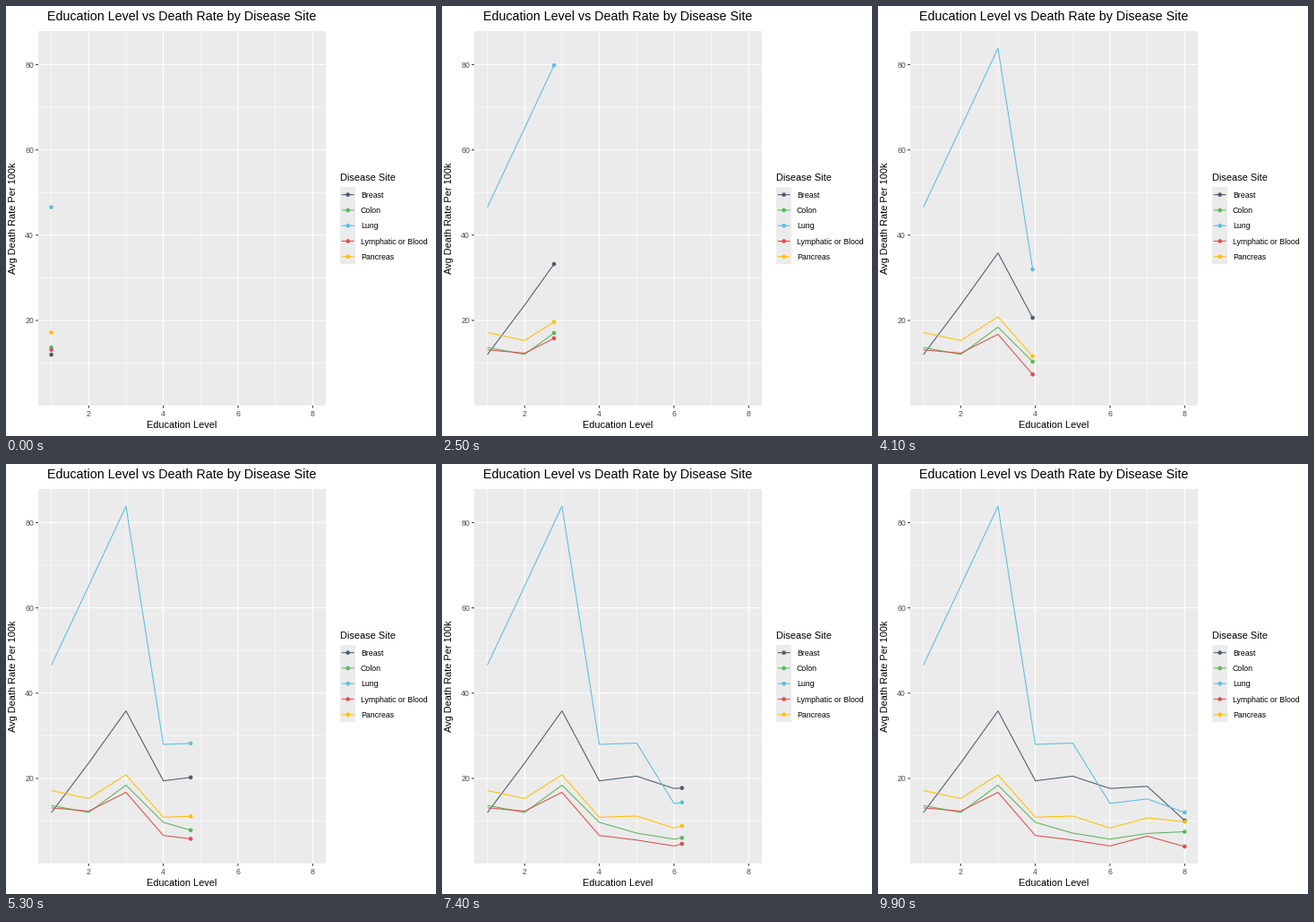
A matplotlib script for the animation above (10000 ms loop, 480x480 px).

```python
import matplotlib.pyplot as plt
import numpy as np
from matplotlib.animation import FuncAnimation
from matplotlib.patches import Circle, Rectangle

plt.rcParams["font.family"] = "Liberation Sans"

SIZE, DPI = 480, 72          # at 72 dpi one point is one pixel
FRAMES, INTERVAL = 100, 100
LEFT, TOP, RIGHT, BOTTOM = 36, 28, 357, 446
LINE, DOT = 1.07, 2.3
PANEL, TEXT, TICK = "#EBEBEB", "#4D4D4D", "#333333"

SERIES = {
    "Breast": ("#4E5D6C", [11.97, 23.61, 35.84, 19.45, 20.53, 17.65, 18.15, 10.13]),
    "Colon": ("#5CB85C", [13.66, 12.02, 18.42, 9.71, 7.18, 5.76, 7.10, 7.50]),
    "Lung": ("#5BC0DE", [46.55, 65.11, 83.86, 27.98, 28.30, 14.14, 15.19, 12.02]),
    "Lymphatic or Blood": ("#D9534F", [13.11, 12.33, 16.74, 6.62, 5.55, 4.16, 6.47, 4.03]),
    "Pancreas": ("#FFC107", [17.16, 15.29, 20.84, 10.90, 11.18, 8.36, 10.76, 9.83]),
}
LEVELS = np.arange(1, 9)
# Each level is reached on a whole frame, with linear motion in between.
KEYS = np.round((LEVELS - 1) * (FRAMES - 1) / 7)


def px(level):
    return 50.6 + 41.67 * (level - 1)


def py(rate):
    return 351 - 4.76 * (rate - 20)


fig = plt.figure(figsize=(SIZE / DPI, SIZE / DPI), dpi=DPI, facecolor="white")
ax = fig.add_axes([0, 0, 1, 1])
ax.set(xlim=(0, SIZE), ylim=(SIZE, 0))
ax.axis("off")


def rect(x, y, w, h, color):
    ax.add_patch(Rectangle((x, y), w, h, fc=color, lw=0))


def line(xs, ys, color, width=LINE, z=2):
    return ax.plot(xs, ys, color=color, lw=width, zorder=z, snap=False,
                   solid_capstyle="butt", solid_joinstyle="round")[0]


def dot(x, y, color):
    return ax.add_patch(Circle((x, y), DOT, fc=color, lw=0, zorder=4))


def text(x, y, s, size, color="black", ha="left", **kw):
    ax.text(x, y, s, fontsize=size, color=color, ha=ha,
            va=kw.pop("va", "baseline"), **kw)


def draw_panel():
    rect(LEFT, TOP, RIGHT - LEFT, BOTTOM - TOP, PANEL)
    for level in LEVELS:
        major = level % 2 == 0
        x = px(level)
        line([x, x], [TOP, BOTTOM], "white", LINE if major else LINE / 2)
        if major:
            line([x, x], [BOTTOM, BOTTOM + 2.74], TICK)
            text(x, 458.2, str(level), 8.8, TEXT, "center")
    for rate in range(10, 90, 10):
        major = rate % 20 == 0
        if rate > 80:
            continue
        y = py(rate)
        line([LEFT, RIGHT], [y, y], "white", LINE if major else LINE / 2)
        if major:
            line([LEFT - 2.74, LEFT], [y, y], TICK)
            text(31, y + 3.2, str(rate), 8.8, TEXT, "right")
    text(196.3, 16, "Education Level vs Death Rate by Disease Site", 14.2, ha="center")
    text(196.3, 471, "Education Level", 11, ha="center")
    text(13, 236.8, "Avg Death Rate Per 100k", 11, ha="right", va="center",
         rotation=90, rotation_mode="default")


def draw_legend():
    x, y, key = 373, 202, 17.28
    text(x, 195, "Disease Site", 11)
    rect(x, y, key, key * len(SERIES), PANEL)
    for i, (name, (color, _)) in enumerate(SERIES.items()):
        mid = y + key * (i + 0.5)
        line([x + 0.1 * key, x + 0.9 * key], [mid, mid], color)
        dot(x + key / 2, mid, color)
        text(x + key + 5.5, mid + 3.2, name, 8.8)


draw_panel()
draw_legend()
tracks = [(np.array(rates), line([], [], color, z=3), dot(0, 0, color))
          for color, rates in SERIES.values()]


def update(frame):
    now = np.interp(frame, KEYS, LEVELS)
    past = LEVELS < now
    artists = []
    for rates, path, head in tracks:
        tip = np.interp(now, LEVELS, rates)
        path.set_data(px(np.append(LEVELS[past], now)),
                      py(np.append(rates[past], tip)))
        head.center = px(now), py(tip)
        artists += [path, head]
    return artists


anim = FuncAnimation(fig, update, frames=FRAMES, interval=INTERVAL,
                     repeat=True, repeat_delay=0)
plt.show()
```
